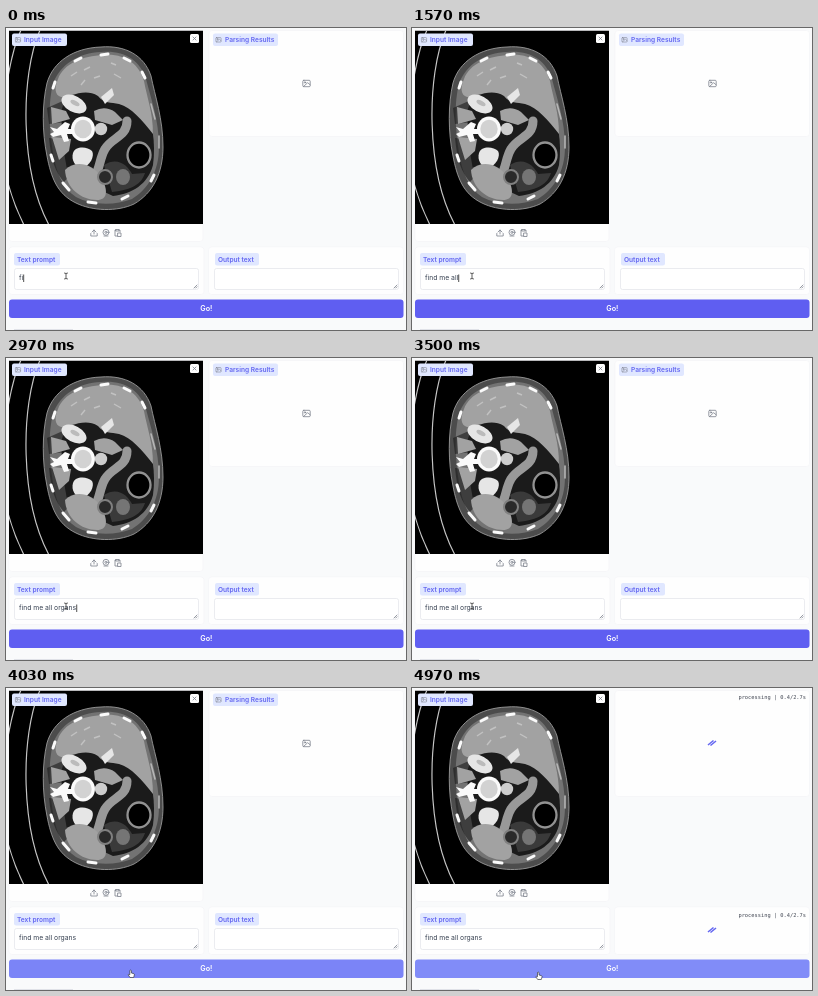
Recreate the animation shown at these times as an HTML page. Size 400x302 px, loop 5010 ms.

```html
<!DOCTYPE html>
<html lang="en">
<head>
<meta charset="utf-8">
<title>Organ finder demo</title>
<style>
  html, body { margin: 0; width: 100%; height: 100%; overflow: hidden; background: #f9fafb; }
  svg { display: block; width: 100vw; height: 100vh; }
  text { font-family: Inter, "Open Sans", sans-serif; font-size: 6.8px; }
  .label { fill: #6366f1; font-weight: 600; font-size: 6.6px; }
  .tag { fill: #e0e7ff; }
  .panel { fill: #fefefe; stroke: #f3f4f6; stroke-width: .6; }
  .field { fill: #fff; stroke: #e2e4ea; stroke-width: .7; }
  .icon { fill: none; stroke: #7c808c; stroke-width: .8; stroke-linecap: round; stroke-linejoin: round; }
  .timer { font: 5.35px "DejaVu Sans Mono", monospace; fill: #3f4450; text-anchor: end; }
  .blade { stroke: #6366f1; stroke-width: 1.5; }
  .bone { fill: #fafafa; }
  .bright { fill: #e6e6e6; }
  .organ { fill: #a2a2a2; }
  .wall { fill: #848484; }
  .fat { fill: #4c4c4c; }
  .dark { fill: #1b1b1b; }
</style>
</head>
<body>
<svg viewBox="0 0 400 302" preserveAspectRatio="none">
  <defs>
    <clipPath id="scanArea"><rect x="3" y="2.5" width="194" height="193.5"/></clipPath>
    <g id="picture" class="icon">
      <rect x="-3.7" y="-3.2" width="7.4" height="6.4" rx="1"/>
      <circle cx="-1.5" cy="-1.1" r=".7"/>
      <path d="M-3 3L1.2-.8L3.6 1.3"/>
    </g>
    <path id="grip" class="icon" d="M-3 0L0-3M-1.2 0L0-1.2"/>
    <g id="loader">
    </g>
  </defs>

  <rect width="400" height="302" fill="#f9fafb"/>
  <rect class="panel" x="3" y="2.5" width="194" height="211" rx="3"/>
  <rect class="panel" x="203" y="2.5" width="194.5" height="106" rx="3"/>
  <rect class="panel" x="3" y="219" width="195" height="47.5" rx="3"/>
  <rect class="panel" x="202.5" y="219" width="195" height="47.5" rx="3"/>
  <path d="M8 301.5H67" stroke="#e0e2e8"/>

  <g clip-path="url(#scanArea)">
    <rect x="3" y="2.5" width="194" height="194" fill="#000"/>
    <g fill="none" stroke="#c4c4c4" stroke-width="1.2">
      <path d="M34 2C14 48 14 143 43 197"/>
      <path d="M15 2C8 17 5 32 2 49M2 155C6 170 11 183 18 197"/>
    </g>
    <path d="M95 19C119 17 138 27 145 48C149 68 157 91 157 119C157 145 147 165 128 176C111 184 86 183 70 175C51 166 45 149 41 128C36 104 36 76 41 55C47 34 67 20 95 19Z" class="fat" stroke="#9a9a9a" stroke-width=".9"/>
    <path class="wall" d="M95 24C118 22 134 32 140 51C145 71 153 92 153 119C153 144 142 161 126 171C108 178 85 177 70 169C56 160 50 143 47 125C43 99 42 75 47 56C54 36 73 25 95 24Z" fill-opacity=".7"/>
    <path class="dark" d="M62 62L88 58L139 74C146 94 150 114 147 137C142 156 126 166 107 168L62 147L57 119L55 84Z"/>
    <path class="organ" d="M52 51C58 35 77 28 97 27C119 25 133 36 138 53C141 70 147 84 147 106C135 91 126 80 113 76C105 74 98 76 92 68C83 62 73 65 66 67C54 73 45 67 52 51Z"/>
    <path class="dark" d="M41 80L59 72L61 94L43 96ZM43 110L63 112L67 144L58 154C49 144 45 131 43 110Z" fill-opacity=".6"/>
    <path class="organ" d="M45 79L60 83L64 91L46 96ZM46 109L65 111L63 123L53 132Z"/>
    <path class="bright" d="M95 69L106 60L108 67L99 76Z"/>
    <ellipse class="bright" cx="68" cy="76" rx="13.5" ry="8" transform="rotate(28 68 76)"/>
    <ellipse cx="69" cy="75" rx="5" ry="2.2" fill="#bbb" transform="rotate(28 69 75)"/>
    <path class="bone" d="M44 99L51 101L59 94L64 96L62 101L68 101L66 106L61 106L63 113L58 114L55 107L47 109L44 106L48 104Z"/>
    <ellipse class="bone" cx="77" cy="101" rx="12" ry="12.5"/>
    <ellipse cx="77" cy="101" rx="8.7" ry="9.2" fill="#d2d2d2"/>
    <circle cx="95" cy="101" r="6.2" fill="#cdcdcd"/>
    <path class="organ" d="M88 83Q99 77 109 84L117 92L106 97L89 92Z"/>
    <path class="bright" d="M67 125C69 118 81 118 86 123C89 128 84 138 76 140C69 139 65 132 67 125Z"/>
    <path d="M121 93C121 109 106 109 99 121C94 129 94 140 89 148" fill="none" stroke="#999" stroke-width="9" stroke-linecap="round"/>
    <path class="organ" d="M59 142C69 132 86 135 95 149C103 163 101 172 91 172C75 172 60 160 59 142Z"/>
    <path class="fat" d="M98 137C112 128 122 138 126 146L139 145C136 155 127 162 106 164Z" fill-opacity=".65"/>
    <circle cx="99" cy="149" r="7" fill="#2a2a2a" stroke="#808080" stroke-width="2"/>
    <ellipse class="wall" cx="117" cy="149" rx="7" ry="8" fill-opacity=".8"/>
    <ellipse cx="133" cy="127" rx="11.5" ry="12.5" fill="#000" stroke="#929292" stroke-width="2.3"/>
    <path d="M65 48L71 44M78 42L84 39M88 50L94 48M108 46L115 50M105 35L110 37M75 57L79 52" stroke="#c2c2c2" stroke-width="1.4"/>
    <g fill="none" stroke="#fafafa" stroke-width="3" stroke-linecap="round">
      <path d="M69 33L75 30M95 27L102 26M118 30L124 33M47 60L49 54M136 44L139 50M57 155L63 162M82 174L90 175M116 171L122 168M145 153L148 147M45 127L47 133"/>
      <path d="M145 76L149 91M153 108L153 120" stroke="#b5b5b5" stroke-width="1.6"/>
    </g>
  </g>

  <rect class="tag" x="6" y="5.5" width="55" height="12.5" rx="2"/>
  <use href="#picture" transform="translate(12 11.8) scale(.7)"/>
  <text class="label" x="18" y="14">Input Image</text>
  <rect x="184" y="6" width="9" height="9" rx="1.5" fill="#fff"/>
  <path class="icon" d="M187 9L190 12M190 9L187 12"/>

  <g class="icon">
    <path d="M88 206V202M86 204L88 202L90 204M84.8 205.5V208H91.2V205.5"/>
    <circle cx="100" cy="204.3" r="3"/><circle cx="100" cy="204.3" r="1.1"/><path d="M98 208H102"/>
    <path d="M110 202H109V208H111.5M113 202H114V204M110 201.5H113V203H110ZM112 205H115V208.5H112Z"/>
  </g>

  <rect class="tag" x="8" y="225" width="46" height="12.5" rx="2"/>
  <text class="label" x="11" y="233.5">Text prompt</text>
  <rect class="field" x="8.5" y="240.5" width="184" height="21" rx="2"/>
  <use href="#grip" x="191" y="260"/>
  <text id="prompt" x="13" y="252" fill="#374151" xml:space="preserve"></text>
  <path id="caret" d="M0 246.5V254" stroke="#222" stroke-width=".8"/>

  <g id="idle">
    <rect class="tag" x="207" y="5.5" width="65" height="12.5" rx="2"/>
    <use href="#picture" transform="translate(212.5 11.8) scale(.7)"/>
    <text class="label" x="219" y="14">Parsing Results</text>
    <use href="#picture" x="300.5" y="55.5"/>
    <rect class="tag" x="209" y="225" width="44" height="12.5" rx="2"/>
    <text class="label" x="212" y="233.5">Output text</text>
    <rect class="field" x="208.5" y="240.5" width="184" height="21" rx="2"/>
    <use href="#grip" x="391" y="260"/>
  </g>

  <g id="busy">
    <text class="timer" x="394" y="10.5"></text>
    <text class="timer" x="394" y="228.5"></text>
    <g transform="translate(300 55)"><path class="blade" d="M-4 2L1.5-2.5"/><path class="blade" d="M-1.5 2.5L4-2"/></g>
    <g transform="translate(300 242)"><path class="blade" d="M-4 2L1.5-2.5"/><path class="blade" d="M-1.5 2.5L4-2"/></g>
  </g>

  <rect id="button" x="3" y="271.5" width="394.5" height="18.5" rx="3"/>
  <text x="200.3" y="283.3" text-anchor="middle" fill="#fff" font-weight="600" style="font-size:7.2px">Go!</text>

  <path id="beam" class="icon" d="M-1.5-3Q0-3 0-2Q0-3 1.5-3M0-2V2M-1.5 3Q0 3 0 2Q0 3 1.5 3" style="stroke:#333"/>
  <path id="arrow" d="M0 0V6L1.5 4.7L2.6 7L3.6 6.5L2.6 4.3H4.5Z" fill="#111" stroke="#fff" stroke-width=".5"/>
  <path id="hand" d="M-1.5-3.5Q-.7-4.3 0-3.4V-1L2.5-.3Q3.2 0 3 1L2.3 3.5H-1.3L-3.2.8Q-3 0-1.5.7Z" fill="#fff" stroke="#222" stroke-width=".6"/>
</svg>
<script>
const LOOP = 5010;
// Each word is typed at its own steady pace: [text, first key, ms per key]
const WORDS = [["fi", 0, 0], ["nd me", 120, 125], [" all", 800, 165], [" organs", 1620, 180]];
const CARET_OFF = 3430, HOVER_START = 3920, BUSY_START = 4570;
// [time, x, y]
const POINTER = [[0, 60, 248], [3650, 60, 248], [3900, 114, 272], [4050, 127, 288]];

const el = Object.fromEntries(
  ["prompt", "caret", "idle", "busy", "button", "beam", "arrow", "hand"]
    .map(id => [id, document.getElementById(id)]));
const timers = document.querySelectorAll(".timer");
const blades = document.querySelectorAll(".blade");

const clamp = v => Math.max(0, Math.min(1, v));
const smooth = v => v * v * (3 - 2 * v);
const mix = (a, b, k) => a + (b - a) * k;
const show = (node, on) => node.setAttribute("visibility", on ? "visible" : "hidden");
const place = (node, x, y) => node.setAttribute("transform", `translate(${x} ${y})`);

function pointerAt(t) {
  const next = POINTER.findIndex(p => p[0] > t);
  if (next < 0) return POINTER.at(-1).slice(1);
  const [a, b] = [POINTER[next - 1], POINTER[next]];
  const k = (t - a[0]) / (b[0] - a[0]);
  return [mix(a[1], b[1], k), mix(a[2], b[2], k)];
}

const typedAt = t => WORDS.map(([text, first, pace]) =>
  [...text].filter((_, i) => first + i * pace <= t).join("")).join("");

function drawPrompt(t) {
  el.prompt.textContent = typedAt(t);
  place(el.caret, 13.5 + el.prompt.getComputedTextLength(), 0);
  show(el.caret, t < CARET_OFF);
}

function drawPointer(t) {
  const [x, y] = pointerAt(t);
  const shape = y < 262 ? el.beam : y < 274 ? el.arrow : el.hand;
  for (const node of [el.beam, el.arrow, el.hand]) show(node, node === shape);
  place(shape, x, y);
  const hover = smooth(clamp((t - HOVER_START) / 150));
  const channels = [[95, 129], [94, 140], [241, 248]].map(([a, b]) => mix(a, b, hover));
  el.button.setAttribute("fill", `rgb(${channels})`);
}

function drawStatus(t) {
  const busy = t >= BUSY_START;
  show(el.idle, !busy);
  show(el.busy, busy);
  if (!busy) return;
  const elapsed = (t - BUSY_START) / 1000;
  timers.forEach(node => node.textContent = `processing | ${elapsed.toFixed(1)}/2.7s`);
  const gap = 1 - smooth(clamp(elapsed / .38));
  blades.forEach((node, i) => {
    const side = i % 2 ? -1 : 1;
    place(node, 1.2 * side * gap, -.9 * side * gap);
  });
}

function render(t) {
  drawPrompt(t);
  drawPointer(t);
  drawStatus(t);
}

const start = performance.now();
function tick() {
  render((performance.now() - start) % LOOP);
  requestAnimationFrame(tick);
}
tick();
</script>
</body>
</html>
```
